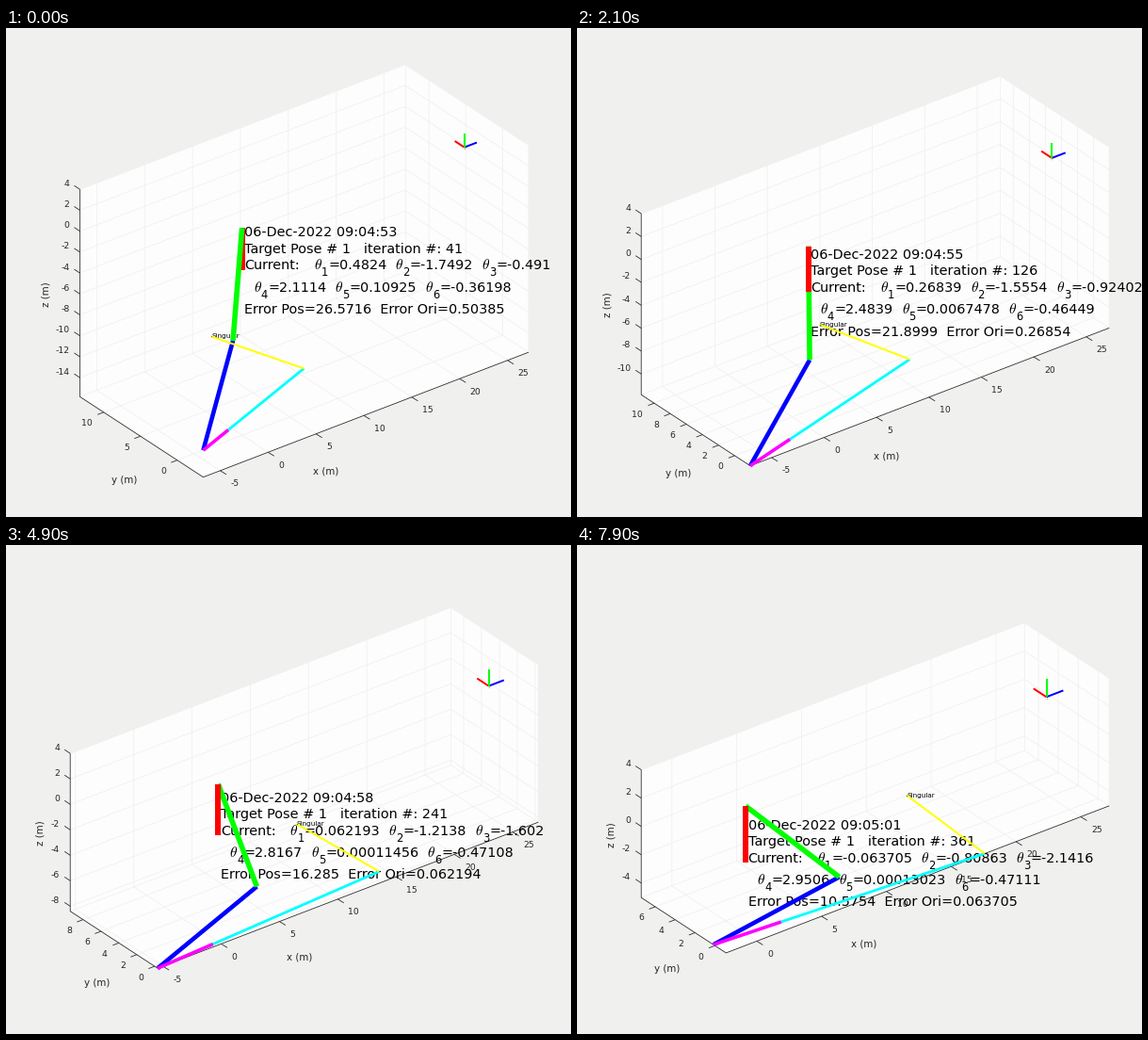
Write a matplotlib script that moves like this. It is 600 px wide and 519 px high and loops after 8 s.

```python
import numpy as np
import matplotlib.pyplot as plt
from matplotlib.animation import FuncAnimation
from matplotlib.collections import LineCollection

W, H, FRAMES, STEP = 600, 519, 80, 100
plt.rcParams.update({"font.family": "DejaVu Sans", "mathtext.fontset": "cm"})

# Orthographic camera: azimuth 37.5, elevation 30; y runs down the screen
AZ, EL = np.radians([37.5, 30])
CAMERA = np.array([[np.cos(AZ), -np.sin(AZ) * np.sin(EL)],
                   [-np.sin(AZ), -np.cos(AZ) * np.sin(EL)],
                   [0, -np.cos(EL)]])
CENTER, FIT = np.array([316.7, 257.7]), np.array([497, 438])

# Solver: 64 drawn updates of 5 iterations each; joint angles at key updates
UPDATES, FIRST = 64, 41
KEYS = np.array([0, 7, 17, 33, 47, 56, 64])
JOINTS = np.array([
    [.4824, .38581, .26839, .11621, .015852, -.030346, -.063705],
    [-1.7492, -1.7407, -1.5554, -1.3149, -1.1099, -.95842, -.80863],
    [-.491, -.51148, -.92402, -1.4219, -1.7688, -1.9743, -2.1416],
    [2.1114, 2.228, 2.4839, 2.7379, 2.8788, 2.9329, 2.9506],
    [.10925, .039795, .0067478, .00047242, 4.9284e-5, 6.9656e-5, .00013023],
    [-.36198, -.43144, -.46449, -.47077, -.47119, -.47117, -.47111]])
GOAL, AXIS = np.array([25.9, 3.5, 1]), 1.3
LINKS = [("red", 6), ("lime", 5.6), ("blue", 4.6), ("magenta", 3.6),
         ("cyan", 2.8), ("yellow", 2)]

INK = (.15, .15, .15)
FONT = 14.35
ADVANCE = {" ": .318, ".": .318, "-": .361, "=": .838, "e": .615}

fig = plt.figure(figsize=(W / 72, H / 72), dpi=72, facecolor="#f0f0ef")
ax = fig.add_axes([0, 0, 1, 1])


def smooth(v, x):
    """Monotone cubic through (KEYS, v)."""
    h = np.diff(KEYS)
    m = np.diff(v) / h
    p = m[:-1] * m[1:]
    inner = np.where(p > 0, 2 * p / (m[:-1] + m[1:]), 0)
    d = np.r_[m[0], inner, m[-1]]
    k = min(np.searchsorted(KEYS, x, "right") - 1, len(h) - 1)
    u = (x - KEYS[k]) / h[k]
    return (v[k] * (1 + 2 * u) * (1 - u) ** 2 + v[k + 1] * u * u * (3 - 2 * u)
            + h[k] * u * (1 - u) * (d[k] * (1 - u) - d[k + 1] * u))


def pose(update):
    q = [smooth(v, update) for v in JOINTS]
    q[4] = np.exp(smooth(np.log(JOINTS[4]), update))
    return q


def arm_points(q):
    """Joint positions from the base to the tool tip."""
    ahead = np.array([np.cos(q[0]), np.sin(q[0]), 0])
    side = np.array([-np.sin(q[0]), np.cos(q[0]), 0])
    up = np.array([0, 0, 1])

    def tilt(a):
        return np.cos(a) * ahead + np.sin(a) * up

    wrist = sum(q[1:4])
    tool = np.cos(q[4]) * side + np.sin(q[4]) * tilt(wrist + np.pi / 2)
    links = [4 * up, 10 * tilt(q[1]), 9.45 * tilt(q[1] + q[2]),
             5 * tilt(wrist), 15 * tilt(wrist), 8.55 * tool]
    return np.vstack([np.zeros(3), np.cumsum(links, axis=0)])


def fit_view(lo, hi):
    """Projection that fits the box between lo and hi into the stage."""
    corners = np.array([[x, y, z] for x in (lo[0], hi[0])
                        for y in (lo[1], hi[1]) for z in (lo[2], hi[2])]) @ CAMERA
    a, b = corners.min(0), corners.max(0)
    scale = min(FIT / (b - a))
    return scale, lambda p: CENTER + scale * (np.asarray(p) @ CAMERA - (a + b) / 2)


def num(v):
    digits = max(5, int(np.floor(np.log10(abs(v)))) + 5) if v else 5
    return f"{v:.{digits}g}"


def text(x, y, s, size, color="k", ha="left", va="baseline", z=3, **kw):
    ax.text(x, y, s, size=size, color=color, ha=ha, va=va, zorder=z, **kw)


def label(x, y, s, size=9.2, ha="center", **kw):
    text(x, y, s, size, INK, ha, "center", 2, **kw)


def line(a, b, color, width, z=5):
    ax.plot([a[0], b[0]], [a[1], b[1]], color=color, lw=width, zorder=z,
            solid_capstyle="butt")


def y_step(span):
    return 5 if span > 14.5 or 10 < span < 12 else 2


def box(lo, hi, scale, view):
    (x0, y0, z0), (x1, y1, z1) = lo, hi
    left, corner, right = view([(x0, y1, z0), (x0, y0, z0), (x1, y0, z0)])
    top = view((x0, y1, z1))
    outline = view([(x0, y1, z1), (x1, y1, z1), (x1, y0, z1),
                    (x1, y0, z0), (x0, y0, z0), (x0, y1, z0)])
    ax.fill(*outline.T, color="#fdfdfd", lw=0, zorder=0)
    grid = [view([(x0, y1, z1), (x1, y1, z1), (x1, y0, z1), (x1, y0, z0)]),
            view([(x0, y1, z0), (x1, y1, z0), (x1, y0, z0)]),
            view([(x1, y1, z0), (x1, y1, z1)])]
    axes = [np.array([top, left, corner, right])]

    # Per axis: tick step, grid path, tick mark, label offset and alignment
    rules = [
        (5, lambda v: [(v, y0, z0), (v, y1, z0), (v, y1, z1)],
         (6.5, 4), (11, 14), "left"),
        (y_step(y1 - y0), lambda v: [(x0, v, z0), (x1, v, z0), (x1, v, z1)],
         (-6.5, 2.5), (-12, 12), "right"),
        (2, lambda v: [(x0, y1, v), (x1, y1, v), (x1, y0, v)],
         (-6, -4), (-11, -6), "right")]
    for i, (step, route, mark, shift, ha) in enumerate(rules):
        for n in range(int(np.ceil(lo[i] / step)), int(hi[i] // step) + 1):
            pts = view(route(n * step))
            grid.append(pts)
            axes.append(np.array([pts[0], pts[0] + mark]))
            label(*(pts[0] + shift), str(n * step), ha=ha)

    ax.add_collection(LineCollection(grid, colors="#f0f0f0", lw=.8, zorder=1))
    ax.add_collection(LineCollection(axes, colors=[INK], lw=.8, zorder=1.5))
    label(*((corner + right) / 2 + (-1.2 - 3.2 * scale, 36 + 1.9 * scale)),
          "x (m)", 10.2)
    label(*((left + corner) / 2 + (-18, 46)), "y (m)", 10.2)
    label(left[0] - (36 if z0 < -10 else 32), (top[1] + left[1]) / 2 + 1,
          "z (m)", 10.2, rotation=90)


def angles(x, y, q, first):
    for i in range(first, first + 3):
        value = "=" + num(q[i])
        text(x, y, r"$\theta$", 15.5)
        text(x + 7.8, y + 7, str(i + 1), 11.5)
        text(x + 15.2, y, value, FONT)
        x += 15.2 + FONT * (sum(ADVANCE.get(c, .636) for c in value) + .636)


def readout(at, q, tip, update, t):
    x, y = at + (2.7, -35.2)
    minute, second = divmod(int(53.35 + .98 * t), 60)
    pos = np.linalg.norm(GOAL - tip)
    ori = np.hypot(q[0], 1.3313 * q[4])
    rows = [(0, f"06-Dec-2022 09:{4 + minute:02d}:{second:02d}"),
            (17.4, f"Target Pose # 1   iteration #: {FIRST + 5 * update}"),
            (35, "Current:"),
            (81.5, f"Error Pos={num(round(pos, 4))}  Error Ori={num(ori)}")]
    for dy, s in rows:
        text(x, y + dy, s, FONT)
    angles(x + 73.5, y + 35, q, 0)
    angles(x + 9.5, y + 58.3, q, 3)


def arm(pts, flipped, singular):
    for i, (color, width) in enumerate(LINKS):
        z = 5 if i or flipped else 7
        line(pts[i], pts[i + 1], color, width, 6 if i == 1 else z)
    tip = pts[-1]
    ax.plot(*tip, ".", ms=3, mew=0, color="#e07000" if flipped else "#40a000",
            zorder=6)
    if singular:
        text(*tip, "Singular", 7.3, va="center", z=4)


def triad(view):
    c = view(GOAL)
    ax.plot(c[0], c[1] + 1.5, ".", ms=4, mew=0, color="#ffd080", zorder=4)
    for color, axis in zip(("blue", "red", "lime"), np.eye(3)):
        line(c, view(GOAL + AXIS * axis), color, 2)


def draw(n):
    ax.clear()
    ax.axis("off")
    ax.set(xlim=(0, W), ylim=(H, 0))
    update = int(np.ceil(UPDATES * n / (FRAMES - 1) - .1))
    q = pose(update)
    joints = arm_points(q)
    extent = np.vstack([joints, GOAL + AXIS * np.eye(3)])
    lo, hi = extent.min(0), extent.max(0)
    scale, view = fit_view(lo, hi)
    pts = view(joints)
    box(lo, hi, scale, view)
    readout(pts[0], q, joints[-1], update, n * STEP / 1000)
    triad(view)
    arm(pts, q[1] < -np.pi / 2, n % 16 != 8)
    return []


anim = FuncAnimation(fig, draw, frames=FRAMES, interval=STEP, repeat=True,
                     repeat_delay=0, init_func=lambda: [])
plt.show()
```
